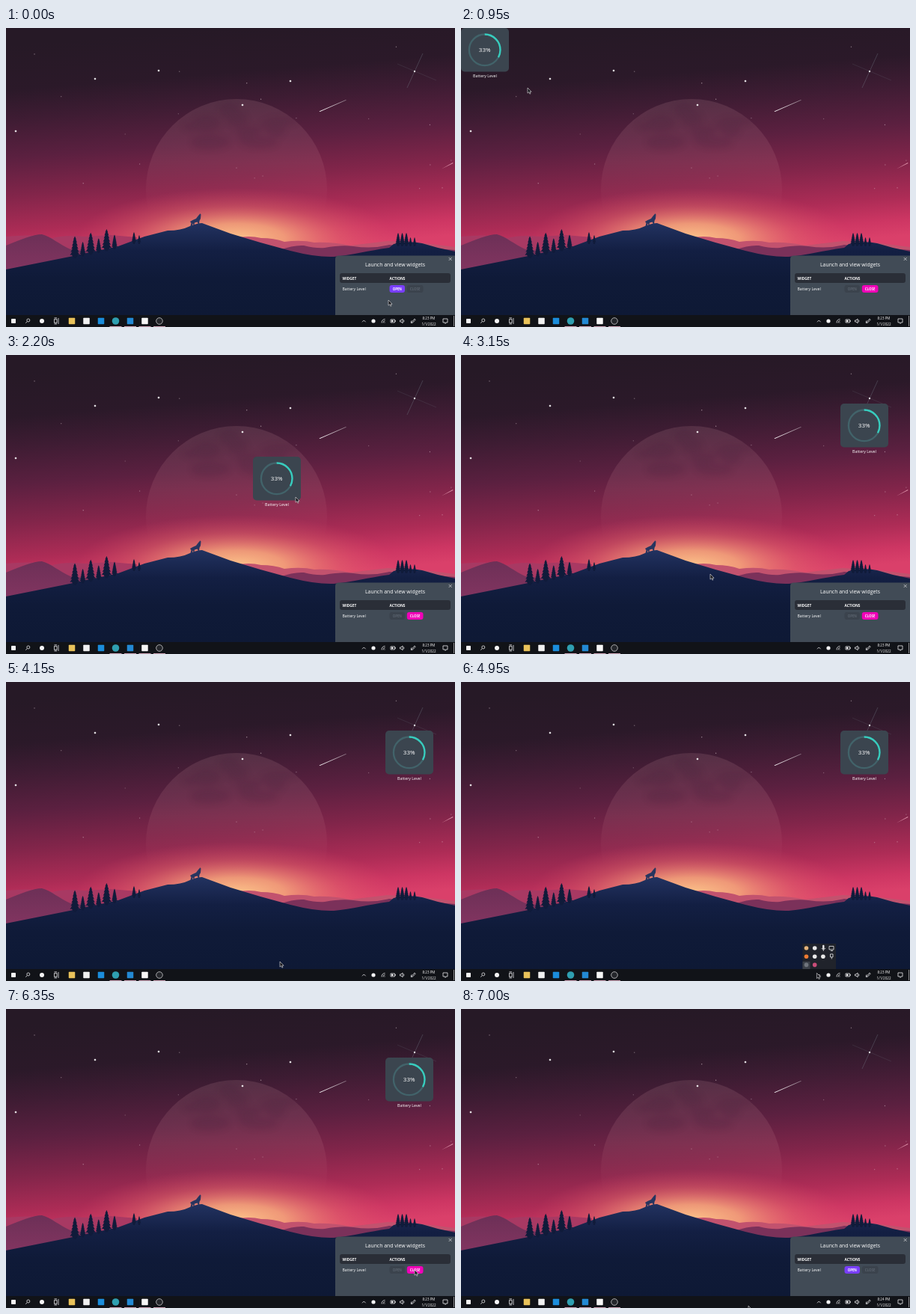
These frames come from a looping animation (600x400 px, 7050 ms). An HTML page:

```html
<!DOCTYPE html>
<html lang="en">
<head>
<meta charset="utf-8">
<title>Desktop widgets</title>
<style>
  html, body { margin: 0; width: 100%; height: 100%; overflow: hidden; background: #10131c; }
  svg { display: block; width: 600px; height: 400px; }
  text { font-family: "Open Sans", "Noto Sans", sans-serif; fill: #fff; }
  .mid { text-anchor: middle; }
  .bold { font-weight: 700; }
  .line { fill: none; stroke: #e8e8ea; stroke-width: .8; }
</style>
</head>
<body>
<svg viewBox="0 0 600 400" xmlns="http://www.w3.org/2000/svg">
  <defs>
    <linearGradient id="sky" gradientUnits="userSpaceOnUse" x1="288" y1="0" x2="312" y2="300">
      <stop offset="0" stop-color="#261926"/>
      <stop offset=".2" stop-color="#2b1929"/>
      <stop offset=".33" stop-color="#3e1c33"/>
      <stop offset=".5" stop-color="#5b2040"/>
      <stop offset=".67" stop-color="#82254a"/>
      <stop offset=".83" stop-color="#ad2c56"/>
      <stop offset=".93" stop-color="#cd3663"/>
      <stop offset="1" stop-color="#da406a"/>
    </linearGradient>
    <radialGradient id="glow">
      <stop offset="0" stop-color="#fcc48a"/>
      <stop offset=".3" stop-color="#f6aa7c" stop-opacity=".85"/>
      <stop offset=".65" stop-color="#ec7a70" stop-opacity=".35"/>
      <stop offset="1" stop-color="#e0506a" stop-opacity="0"/>
    </radialGradient>
    <linearGradient id="moon" x1="0" y1="0" x2="0" y2="1">
      <stop offset="0" stop-color="#d8a0ac" stop-opacity=".15"/>
      <stop offset=".35" stop-color="#d8909c" stop-opacity=".13"/>
      <stop offset=".62" stop-color="#e08090" stop-opacity="0"/>
    </linearGradient>
    <linearGradient id="hill" gradientUnits="userSpaceOnUse" x1="0" y1="261" x2="0" y2="384">
      <stop offset="0" stop-color="#223260"/>
      <stop offset=".3" stop-color="#131f43"/>
      <stop offset=".6" stop-color="#0f1a38"/>
      <stop offset="1" stop-color="#0e1935"/>
    </linearGradient>
    <linearGradient id="far" x1="0" y1="0" x2="0" y2="1">
      <stop offset="0" stop-color="#6d3057"/>
      <stop offset="1" stop-color="#843561"/>
    </linearGradient>
    <linearGradient id="trail" x1="0" y1="1" x2="1" y2="0">
      <stop offset="0" stop-color="#fff"/>
      <stop offset="1" stop-color="#fff" stop-opacity=".35"/>
    </linearGradient>
    <filter id="soft"><feGaussianBlur stdDeviation="4"/></filter>
    <clipPath id="disc"><circle cx="308" cy="216" r="121"/></clipPath>
  </defs>

  <rect width="600" height="400" fill="url(#sky)"/>
  <circle cx="308" cy="216" r="121" fill="url(#moon)"/>
  <g clip-path="url(#disc)"><g id="seas" filter="url(#soft)" fill="#3a1831" opacity=".14"></g></g>
  <ellipse cx="308" cy="282" rx="215" ry="68" fill="url(#glow)"/>
  <g id="stars" fill="#fff"></g>
  <g stroke="#8fa3ac" stroke-width=".6">
    <path d="M557 34L536 80" opacity=".45"/>
    <path d="M523 48L575 70" opacity=".22"/>
    <circle cx="546" cy="58" r="1.2" stroke="none" fill="#fff" opacity=".8"/>
  </g>
  <path d="M418.5 111.5L454 96L455 96.6L419.5 112Z" fill="url(#trail)"/>
  <path d="M582 188.5L597 180L597.5 181Z" fill="#f3a9be" opacity=".8"/>

  <path d="M0 279Q40 275 62 281Q80 276 105 279L140 277L175 280V320H0Z" fill="#a83963"/>
  <path d="M305 281Q325 277 341 281Q358 281 372 286Q395 283 412 287Q435 286 460 291L510 285L560 288L600 293V320H305Z" fill="#c2526e"/>
  <path d="M0 291C20 283 36 276 48 276C60 279 72 290 86 296L120 300V330H0Z" fill="url(#far)"/>
  <path d="M365 297Q385 290 398 291Q414 295 426 294Q448 290 464 292Q490 296 512 290L600 297V320H365Z" fill="#7b315a"/>
  <path d="M0 323L85 306L150 292L185 279L216 271Q234 271 246 265Q256 261 262 261L300 275L340 287L380 298Q415 307 438 306C462 304 488 297 512 294L518 289Q538 284 556 288Q578 295 600 299V384H0Z" fill="url(#hill)"/>
  <g id="trees" fill="#101b3a"></g>
  <path d="M246.500 265L247.500 261L246 259L249.500 257L254 255L257 251L259.500 248.300L260.500 249.500L260 255L258.500 258L258 262.500H256.800L255.800 259.500L252 260.500L251.500 263.500H250.300L250 261L248.500 265Z" fill="#27355f"/>

  <g id="panel">
    <path d="M440 384V309Q440 304.500 445 304.500H600V384Z" fill="#414b56"/>
    <path d="M591.700 307L595.700 311M595.700 307L591.700 311" class="line" opacity=".8"/>
    <text class="mid" x="520" y="318.700" font-size="6.900">Launch and view widgets</text>
    <rect x="446" y="328" width="148" height="13" rx="3" fill="#2a2e37"/>
    <text class="bold" x="449.500" y="336.500" font-size="4.800">WIDGET</text>
    <text class="bold" x="512.500" y="336.500" font-size="4.800">ACTIONS</text>
    <text x="449.500" y="350.900" font-size="5.200">Battery Level</text>
    <rect id="openBox" x="512.500" y="344" width="20.500" height="10" rx="3"/>
    <text id="openText" class="mid bold" x="522.800" y="350.600" font-size="4.400">OPEN</text>
    <rect id="closeBox" x="535.800" y="344" width="21.700" height="10" rx="3"/>
    <text id="closeText" class="mid bold" x="546.600" y="350.600" font-size="4.400">CLOSE</text>
  </g>

  <g id="widget">
    <rect width="64" height="58.500" rx="5" fill="#3b454f"/>
    <g fill="none" stroke-width="2.300" transform="translate(31.700 29.300) rotate(-90)">
      <circle r="20.800" stroke="#42636a"/>
      <circle r="20.800" stroke="#37cdbe" pathLength="100" stroke-dasharray="33 67"/>
    </g>
    <text class="mid" x="31.700" y="32.200" font-size="8">33%</text>
    <text class="mid" x="32" y="66.300" font-size="5.300">Battery Level</text>
  </g>

  <rect y="384" width="600" height="16" fill="#111318"/>
  <g id="apps"></g>
  <g class="line">
    <circle cx="29.800" cy="391" r="2"/><path d="M28.300 392.600L26.300 394.800"/>
    <path d="M64.500 389.500H68V394.500H64.500ZM64.500 387.800H68M64.500 396H68M70 388V396"/>
    <path d="M476 393.300L478.300 391L480.600 393.300"/>
    <path d="M502 394.500A5 5 0 0 1 506.500 389.500M504 394.500A3 3 0 0 1 506.500 391.500M506 394.500V393.500"/>
    <path d="M514 390H519.500V394H514ZM520.300 391V393"/><path d="M515 392H517.500" stroke-width="2.500"/>
    <path d="M526.500 391H528L530 389V395L528 393H526.500ZM531.300 390.500Q532.500 392 531.300 393.500"/>
    <path d="M541 395L546 389L547 390.500L542.500 395Q540 393 542 391.500"/>
    <path d="M584 389H590V394H588L587 395.500V394H584Z"/>
    <path d="M598.500 385V399" stroke-width=".6"/>
  </g>
  <text id="clock" class="mid" x="565" y="390.400" font-size="4.500"></text>
  <text class="mid" x="565" y="397.800" font-size="4.600">1/1/2022</text>

  <g id="tray">
    <rect x="456.500" y="350" width="44.500" height="34" fill="#20232b"/>
    <rect x="456.500" y="374" width="10" height="10" fill="#3b4049"/>
    <g id="trayIcons"></g>
    <g class="line">
      <path d="M484.300 353V356.500" stroke-width="2.400" stroke-linecap="round"/>
      <path d="M481.700 356Q484.300 360 487 356M484.300 358V360"/>
      <path d="M492 353.500H498V358H492ZM494 359.500H497"/>
      <path d="M493.500 364H497V368H493.500ZM495.300 368V370.500"/>
    </g>
  </g>

  <path id="cursor" d="M0 0V7.200L1.700 5.700L2.900 8.200L4 7.700L2.900 5.300H5.100Z" fill="#15151a" stroke="#e6e6e8" stroke-width=".6"/>
</svg>

<script>
const $ = id => document.getElementById(id);

function add(parent, tag, attrs) {
  const el = document.createElementNS("http://www.w3.org/2000/svg", tag);
  for (const key in attrs) el.setAttribute(key, attrs[key]);
  $(parent).append(el);
}
const circle = (parent, cx, cy, r, fill, more) => add(parent, "circle", { cx, cy, r, fill, ...more });
const square = (parent, cx, cy, size, fill) =>
  add(parent, "rect", { x: cx - size / 2, y: cy - size / 2, width: size, height: size, rx: .8, fill });

let seed = 11;
function random(low, high) {
  seed = seed * 16807 % 2147483647;
  return low + (high - low) * seed / 2147483647;
}

// Sky
for (let i = 0; i < 12; i++)
  add("seas", "ellipse", { cx: random(250, 375), cy: random(105, 165), rx: random(10, 24), ry: random(5, 12) });

for (const [x, y] of [[119, 68], [204, 57], [380, 71], [316, 103], [13, 138]]) {
  circle("stars", x, y, 1.1, "#fff");
  add("stars", "path", { d: `M${x - 2} ${y}h4M${x} ${y - 2}v4`, stroke: "#fff", "stroke-width": .5, opacity: .6 });
}
for (let i = 0; i < 20; i++)
  circle("stars", random(10, 595), random(25, 215), .7, "#e9d5dc", { opacity: random(.25, .6) });

// Trees: tiers that widen towards the base, mirrored on the trunk
function tree(x, base, h) {
  const right = [[0, -h]];
  for (let i = 1; i <= 6; i++) {
    const y = h * (i / 6.5 - 1), out = h * .24 * (.15 + i * .14);
    right.push([out, y], [out * .65, y - .3]);
  }
  right.push([1, 2]);
  const left = right.map(([dx, dy]) => [-dx, dy]).reverse();
  add("trees", "polygon", { points: [...right, ...left].map(([dx, dy]) => [x + dx, base + dy]).join(" ") });
}
for (let i = 0; i < 6; i++) tree(92 + i * 10.6, 306 - i * 2.4, i % 2 ? 17.5 : 27.5);
for (let i = 0; i < 2; i++) tree(171 + i * 7, 287, 14 - i * 4);
for (let i = 0; i < 5; i++) tree(524 + i * 5.5, 290, i < 3 ? 16 : 10);

// Taskbar
const slot = i => 10 + i * 19.5;
square("apps", slot(0), 392, 6, "#f4f4f5");
circle("apps", 48, 392, 3, "#f4f4f5");
["#e9c25a", "#f0f0f0", "#1b8ddb"].forEach((color, i) => square("apps", slot(i + 4), 392, 8.5, color));
circle("apps", slot(7), 392, 4.8, "#2f9fb0");
square("apps", slot(8), 392, 8.5, "#2389d3");
square("apps", slot(9), 392, 8.5, "#f6f6f6");
circle("apps", slot(10), 392, 4.3, "#24262b", { stroke: "#c9c9cc", "stroke-width": .8 });
circle("apps", 491, 392, 2.6, "#f4f4f5");
for (let i = 7; i <= 10; i++)
  add("apps", "rect", { x: slot(i) - 8, y: 399, width: 16, height: 1, fill: "#cfa3b6" });

// Overflow icons, row by row; gaps hold the line icons
["#e3b27a", "#e8e8e8", "", "", "#ef7b32", "#e8e8e8", "#e8e8e8", "", "#70757d", "#c94d78"].forEach((color, i) => {
  if (color) circle("trayIcons", 461.5 + i % 4 * 11.2, 356 + Math.floor(i / 4) * 11.2, 2.8, color);
});

// Timeline in ms
const LOOP = 7050, STEP = 50;
const OPENED = 450, GRAB = 1250, DROP = 2700, HIDDEN = 3700;
const TRAY = 4750, SHOWN = 5650, TRAY_OFF = 5800, MINUTE = 6400, CLOSED = 6700;

const path = [
  [0, 511, 364], [300, 522, 349], [OPENED, 522, 349],
  [950, 89, 80], [1150, 57, 54], [GRAB, 57, 54],
  [2200, 387, 190], [DROP, 564, 119], [2800, 564, 119],
  [3150, 333, 293], [3600, 594, 309], [HIDDEN, 594, 309],
  [4150, 366, 374], [4650, 478, 391], [TRAY, 478, 391],
  [5500, 460, 380], [5700, 458, 379],
  [6350, 546, 349], [CLOSED, 546, 349], [7000, 384, 397]
];

const slope = (i, k) => (path[i + 1][k] - path[i][k]) / (path[i + 1][0] - path[i][0]);

// Speed at a key: keeps flowing in one direction, stops at turns and rests
function speed(i, k) {
  if (i === 0 || i === path.length - 1) return 0;
  const a = slope(i - 1, k), b = slope(i, k);
  return a * b > 0 ? 2 * a * b / (a + b) : 0;
}

function pointer(t) {
  const next = path.findIndex(p => p[0] > t);
  if (next < 0) return path.at(-1).slice(1);
  const i = next - 1, from = path[i], to = path[next];
  const span = to[0] - from[0], u = (t - from[0]) / span, v = 1 - u;
  return [1, 2].map(k =>
    v * v * (1 + 2 * u) * from[k] + u * u * (3 - 2 * u) * to[k]
    + span * u * v * (v * speed(i, k) - u * speed(next, k)));
}

const place = (id, [x, y]) => $(id).setAttribute("transform", `translate(${x} ${y})`);
const show = (id, on) => $(id).setAttribute("visibility", on ? "visible" : "hidden");
function button(name, on, color) {
  $(name + "Box").setAttribute("fill", on ? color : "#3b434d");
  $(name + "Text").style.fill = on ? "#fff" : "#5a636e";
}

function draw(t) {
  const live = t >= OPENED && t < CLOSED;
  const [x, y] = pointer(Math.min(Math.max(t, GRAB), DROP));
  place("cursor", pointer(t));
  place("widget", [x - 57, y - 54]);
  show("widget", live);
  show("panel", t < HIDDEN || t >= SHOWN);
  show("tray", t >= TRAY && t < TRAY_OFF);
  button("open", !live, "#793ef9");
  button("close", live, "#f000b8");
  $("clock").textContent = t < MINUTE ? "8:23 PM" : "8:24 PM";
}

const start = performance.now();
function tick() {
  const t = (performance.now() - start) % LOOP;
  draw(Math.floor(t / STEP) * STEP);
  requestAnimationFrame(tick);
}
tick();
</script>
</body>
</html>
```
